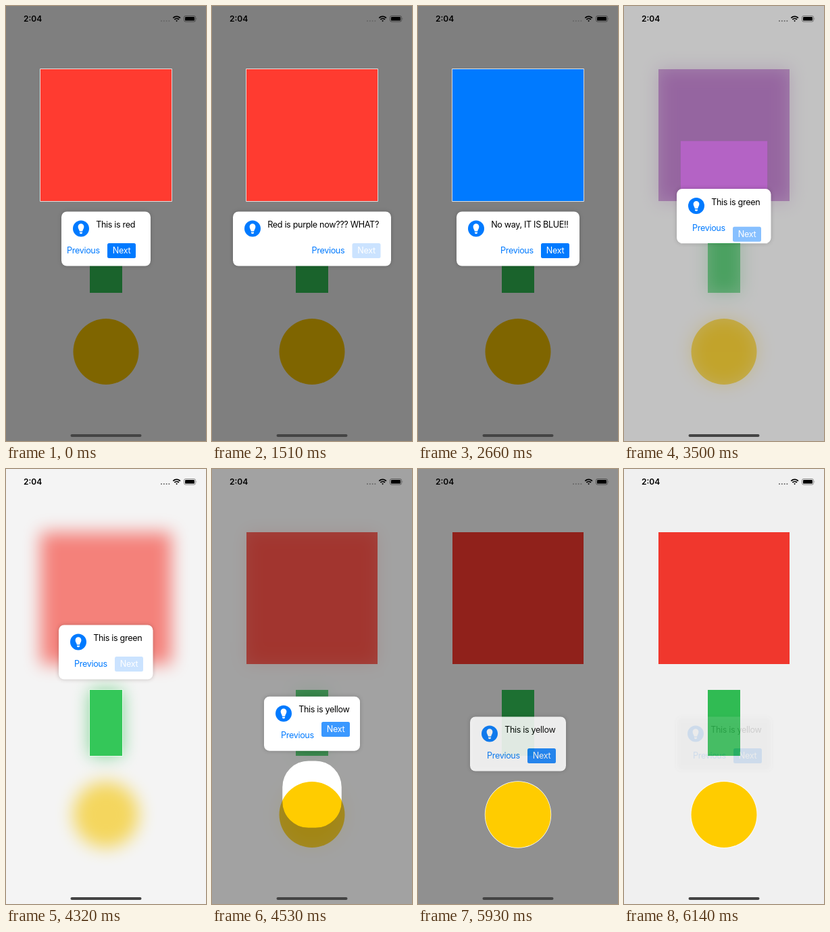
An HTML page that plays this animation: 296 by 640 pixels, repeating every 6210 ms.

```html
<!DOCTYPE html>
<html lang="en">
<head>
<meta charset="utf-8">
<title>Guided tour</title>
<style>
  html, body { margin: 0; width: 100%; height: 100%; overflow: hidden; background: #fff; }
  svg { display: block; width: 100%; height: 100%; }
  text { font: 12.6px Inter, Roboto, sans-serif; letter-spacing: -.33px; }
  .clock { font-weight: 600; font-size: 12px; letter-spacing: 0; }
</style>
</head>
<body>
<svg viewBox="0 0 296 640">
  <defs>
    <filter id="frosting" filterUnits="userSpaceOnUse" x="-60" y="-60" width="416" height="760" color-interpolation-filters="sRGB">
      <feGaussianBlur stdDeviation="13"/>
    </filter>
    <filter id="soft" x="-20%" y="-30%" width="140%" height="160%"><feGaussianBlur stdDeviation="3"/></filter>
    <clipPath id="outside"><path id="cutout" clip-rule="evenodd"/></clipPath>
  </defs>

  <rect width="296" height="640" fill="#fff"/>
  <g id="scene">
    <rect id="square" x="51" y="93" width="194" height="194"/>
    <rect x="124" y="325" width="48" height="97" fill="#34c759"/>
    <circle cx="148" cy="508.5" r="48.5" fill="#fc0"/>
  </g>

  <g id="overlay" clip-path="url(#outside)">
    <rect class="dim" width="296" height="640"/>
    <g id="frost">
      <rect width="296" height="640" fill="#fff"/>
      <use href="#scene" filter="url(#frosting)"/>
      <rect class="dim" width="296" height="640"/>
      <rect width="296" height="640" fill="#e4e4e4" opacity=".41"/>
    </g>
  </g>

  <text class="clock" x="26" y="23">2:04</text>
  <g fill="#666">
    <circle cx="230" cy="22" r="1"/><circle cx="233.8" cy="22" r="1"/>
    <circle cx="237.6" cy="22" r="1"/><circle cx="241.4" cy="22" r="1"/>
  </g>
  <g fill="none" stroke="#000" stroke-width="1.8">
    <path d="M247.3 17.6a7.6 7.6 0 0 1 10.6 0M249.3 19.9a4.8 4.8 0 0 1 6.6 0"/>
    <path d="M252.6 20.9l-1.4 .7 1.4 1.7 1.4-1.7z" fill="#000" stroke="none"/>
  </g>
  <rect x="263.5" y="14.5" width="17" height="8.6" rx="2.4" fill="none" stroke="#000" stroke-opacity=".4"/>
  <rect x="265" y="16" width="14" height="5.6" rx="1.2"/>
  <path d="M281.6 17.3q1.3 1.5 0 3z" opacity=".45"/>
  <rect x="95.5" y="630" width="105" height="4" rx="2" fill="#444"/>

  <rect id="shadow" height="80" rx="8" filter="url(#soft)"/>
  <g id="card">
    <rect id="panel" height="80" rx="8" fill="#fff"/>
    <g id="bulb">
      <circle r="12" fill="#007aff"/>
      <path d="M-2.2 4C-2.2 1.5-4.4 .4-4.4-2.8a4.4 4.4 0 0 1 8.8 0C4.4 .4 2.2 1.5 2.2 4z" fill="#fff"/>
      <path d="M-2 5.2h4v1q-.5 1.5-2 1.5t-2-1.5z" fill="#fff"/>
    </g>
    <text id="message"></text>
    <text id="previous" fill="#007aff">Previous</text>
    <g id="next">
      <rect width="42" height="22" rx="2.5" fill="#007aff"/>
      <text x="21" y="15.2" text-anchor="middle" fill="#fff">Next</text>
    </g>
  </g>
</svg>
<script>
const LOOP = 6210, DURATION = 440, BUTTON_LAG = 25;
const TAPS = [1510, 2220, 3380, 4320, 5650];
// The picture holds still between these times.
const TICKS = [0, 1510, 1630, 1740, 1850, 1970, 2220, 2340, 2440, 2550, 2660, 3380, 3500, 3600,
  3710, 3820, 4320, 4420, 4530, 4640, 4760, 5650, 5820, 5930, 6030, 6140];

const NOTES = [
  { text: 'This is red', x: 82, width: 132, next: 150 },
  { text: 'Red is purple now??? WHAT?', x: 31, width: 234, next: 207.5 },
  { text: 'No way, IT IS BLUE!!', x: 57, width: 182, next: 182 },
  { text: 'This is green', x: 78, width: 139.5, next: 161 },
  { text: 'This is yellow', x: 77, width: 142, next: 162 }
];
const NOTE_Y = [302.5, 229.5, 364.5];
const HOLES = [[51, 93, 194, 194, 0], [124, 325, 48, 97, 0], [99.5, 460, 97, 97, 48.5]];
const RED = [255, 59, 48], PURPLE = [175, 82, 222], BLUE = [0, 122, 255];

const byId = id => document.getElementById(id);
const set = (target, attributes) => {
  const element = typeof target === 'string' ? byId(target) : target;
  for (const [name, value] of Object.entries(attributes)) element.setAttribute(name, value);
};
const mix = (a, b, p) => a + (b - a) * p;
const mixAll = (a, b, p) => a.map((v, i) => mix(v, b[i], p));

// Colours blend in linear light.
const toLinear = v => ((v / 255 + .055) / 1.055) ** 2.4;
const toSrgb = v => 255 * (1.055 * v ** (1 / 2.4) - .055);
const blend = (a, b, p) => mixAll(a.map(toLinear), b.map(toLinear), p).map(toSrgb);

// cubic-bezier(.25, .1, .25, 1)
function ease(x) {
  if (x <= 0) return 0;
  if (x >= 1) return 1;
  const curve = (a, b, s) => 3 * a * s * (1 - s) ** 2 + 3 * b * s * s * (1 - s) + s ** 3;
  let low = 0, high = 1;
  for (let i = 0; i < 24; i++) {
    const mid = (low + high) / 2;
    if (curve(.25, .25, mid) < x) low = mid; else high = mid;
  }
  return curve(.1, 1, low);
}

function cutoutPath([x, y, w, h, r]) {
  const pad = .7;
  x -= pad; y -= pad; w += 2 * pad; h += 2 * pad;
  if (r) r += pad;
  const arc = (dx, dy) => `a${r} ${r} 0 0 1 ${dx} ${dy}`;
  return `M0 0H296V640H0ZM${x + r} ${y}h${w - 2 * r}${arc(r, r)}v${h - 2 * r}${arc(-r, r)}` +
    `h${2 * r - w}${arc(-r, -r)}v${2 * r - h}${arc(r, -r)}Z`;
}

function render(now) {
  const time = now % LOOP;
  const t = TICKS.filter(tick => tick <= time).pop();
  const since = start => ease((t - start) / DURATION);
  const [toPurple, toBlue, toGreen, toYellow] = TAPS.map(since);
  const visible = 1 - since(5876);
  const journey = (stops, lag, blendStops) => blendStops(
    blendStops(stops[0], stops[1], since(TAPS[2] + lag)), stops[2], since(TAPS[3] + lag));

  let color = blend(RED, PURPLE, toPurple);
  color = blend(color, BLUE, toBlue);
  color = blend(color, RED, toGreen);
  set('square', { fill: `rgb(${color.map(Math.round)})` });

  const frost = toGreen * (1 - toYellow);
  for (const dim of document.querySelectorAll('.dim')) set(dim, { opacity: .5 * (1 - frost) });
  set('frost', { opacity: frost });
  set('overlay', { opacity: visible });
  set('cutout', { d: cutoutPath(journey(HOLES, 0, mixAll)) });

  // Recolouring swaps the note at once; moving on swaps it just after the tap.
  const index = [t >= TAPS[0], t >= TAPS[1], t > TAPS[2], t > TAPS[3]].filter(Boolean).length;
  const { text, x, width, next } = NOTES[index];
  const y = journey(NOTE_Y, 0, mix);
  const buttonY = journey(NOTE_Y, BUTTON_LAG, mix) + 46.5;
  const lastTap = TAPS.filter(tap => tap <= t).pop() ?? -LOOP;

  set('shadow', { x, y, width, opacity: .2 * visible });
  set('card', { opacity: visible });
  set('panel', { x, y, width });
  set('bulb', { transform: `translate(${x + 29} ${y + 25})` });
  set('message', { x: x + 51.2, y: y + 23.6 });
  byId('message').textContent = text;
  set('previous', { x: next - 60, y: y + 61.7 });
  set('next', {
    transform: `translate(${next} ${buttonY})`,
    opacity: mix(.2, 1, since(lastTap + BUTTON_LAG))
  });
}

const start = performance.now();
function frame() {
  render(performance.now() - start);
  requestAnimationFrame(frame);
}
frame();
</script>
</body>
</html>
```
